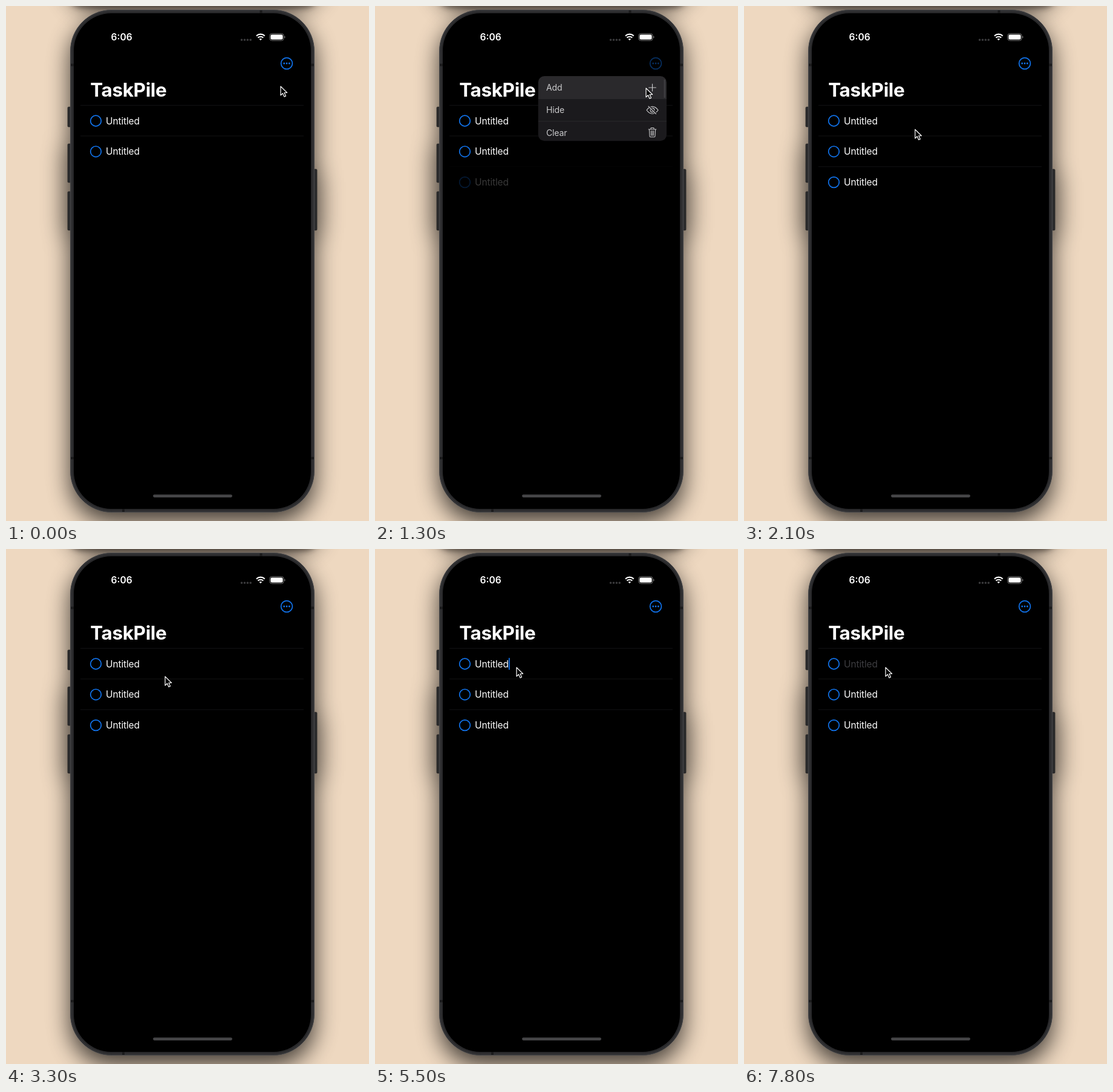
Animation, 600 px wide and 852 px high, one loop 8000 ms. Source, as an HTML page:

```html
<!DOCTYPE html>
<html lang="en">
<head>
<meta charset="utf-8">
<title>Task list</title>
<style>
html, body { margin: 0; width: 100%; height: 100%; overflow: hidden; background: #eed8c0; }
svg { display: block; }
text { font: 15.5px Inter, "Open Sans", sans-serif; letter-spacing: -.12px; fill: #fff; white-space: pre; }
.line { fill: none; stroke: #1174ee; stroke-width: 1.7; }
.icon { fill: none; stroke: #e4e4e6; stroke-width: 1.3; stroke-linecap: round; stroke-linejoin: round; }
#menu text { fill: #e4e4e6; }
</style>
</head>
<body>
<svg width="600" height="852" viewBox="0 0 600 852">
  <defs>
    <filter id="soft" x="-30%" y="-30%" width="160%" height="160%"><feGaussianBlur stdDeviation="19"/></filter>
    <filter id="tight" x="-10%" y="-50%" width="120%" height="200%"><feGaussianBlur stdDeviation="4"/></filter>
    <clipPath id="clip"><rect id="clipBox" rx="11"/></clipPath>
    <g id="row">
      <circle class="line" cx="148.5" cy="190" r="8.8"/>
    </g>
  </defs>

  <rect width="600" height="852" fill="#eed8c0"/>
  <!-- shadow of the device above, then of this one with its side buttons -->
  <rect x="100" y="-300" width="420" height="307" rx="50" opacity=".7" filter="url(#soft)"/>
  <rect x="98" y="-60" width="424" height="63" rx="30" fill="#3a302a" opacity=".6" filter="url(#tight)"/>
  <g opacity=".72" filter="url(#soft)">
    <rect x="106" y="22" width="404" height="832" rx="68"/>
    <rect x="97" y="235" width="20" height="146"/>
    <rect x="499" y="278" width="20" height="103"/>
  </g>

  <g fill="#2b2b2c" stroke="#1b1b1c" stroke-width=".6">
    <rect x="102" y="167" width="6" height="33" rx="1.5"/>
    <rect x="102" y="228" width="6" height="64" rx="1.5"/>
    <rect x="102" y="307" width="6" height="64" rx="1.5"/>
    <rect x="508" y="270" width="6" height="101" rx="1.5"/>
  </g>
  <rect x="106.5" y="6.5" width="403" height="831" rx="68" fill="#29292b" stroke="#4c4c4e"/>
  <rect x="108.5" y="8.5" width="399" height="827" rx="66" fill="none" stroke="#3a3a3c"/>
  <path d="M107 97.5h5M504 97.5h5M107 748h5M504 748h5M421.5 7v5M194 832v5" stroke="#1b1b1c" stroke-width="4"/>
  <rect x="112" y="12" width="392" height="820" rx="62"/>

  <text x="173.5" y="57.2" style="font-size:15.6px;font-weight:600;letter-spacing:0">6:06</text>
  <g fill="#3c3c3e">
    <circle cx="389.5" cy="56" r="1.8"/><circle cx="394.4" cy="56" r="1.8"/>
    <circle cx="399.3" cy="56" r="1.8"/><circle cx="404.2" cy="56" r="1.8"/>
  </g>
  <g fill="none" stroke="#fff" stroke-width="2.1">
    <path d="M413.9 49.4a10 10 0 0 1 13.8 0M416.4 52.6a6.3 6.3 0 0 1 8.8 0"/>
    <path d="M418.5 54.6q2.3-1.9 4.6 0l-2.3 2.5z" fill="#fff" stroke="none"/>
  </g>
  <rect x="435.7" y="45.6" width="23.4" height="11.6" rx="3.8" fill="none" stroke="#777" stroke-width="1"/>
  <rect x="437.3" y="47.2" width="20.2" height="8.4" rx="2.4" fill="#fff"/>
  <path d="M460.3 49.6q1.3 .5 1.3 1.8t-1.3 1.8z" fill="#777"/>

  <g id="more">
    <circle class="line" cx="464" cy="95" r="9.4"/>
    <g fill="#1174ee"><circle cx="459.7" cy="95" r="1.4"/><circle cx="464" cy="95" r="1.4"/><circle cx="468.3" cy="95" r="1.4"/></g>
  </g>
  <text x="139.3" y="149.6" style="font-size:31.5px;font-weight:700;letter-spacing:-.4px">TaskPile</text>
  <path d="M123 164.3H492M123 215H492" stroke="#131315"/>

  <use href="#row"/>
  <text id="first" x="165" y="195.6">Untitled</text>
  <rect id="caret" y="180" width="1.8" height="20" rx=".9" fill="#1174ee"/>
  <use href="#row" y="50.8"/>
  <text x="165" y="246.4">Untitled</text>
  <g id="added">
    <path d="M123 265.8H492" stroke="#131315"/>
    <use href="#row" y="101.6"/>
    <text x="165" y="297.2">Untitled</text>
  </g>
  <rect x="243" y="808.3" width="131" height="4.6" rx="2.3" fill="#454547"/>

  <g id="menu" clip-path="url(#clip)">
    <rect id="panel" x="240" y="116" width="250" height="125" fill="#1c1b1e"/>
    <g id="content">
      <rect id="press" width="235" height="41.5" fill="#fff"/>
      <path d="M0 41.4H235M0 82.8H235" stroke="#303034"/>
      <text x="14.6" y="26.3">Add</text>
      <text x="14.6" y="67.7">Hide</text>
      <text x="14.6" y="109.1">Clear</text>
      <g class="icon">
        <path d="M202.5 21H215.5M209 14.5V27.5"/>
        <path d="M198.5 62.3q4.5-6.6 10.5-6.6t10.5 6.6q-4.5 6.6-10.5 6.6t-10.5-6.6z"/>
        <circle cx="209" cy="62.3" r="3.7"/>
        <path d="M202.3 55.2L216 69" stroke="#1c1b1e" stroke-width="3.4"/>
        <path d="M201.8 55.4L215.6 69.2"/>
        <path d="M202 97.4H216M206.2 97.2V95.6q0-1 1-1H210.8q1 0 1 1V97.2M203.3 97.6L204 110q.1 1.6 1.6 1.6H212.4q1.5 0 1.6-1.6L214.7 97.6M206.6 100.2L206.9 108.8M209 100.2V108.8M211.4 100.2L211.1 108.8" stroke-width="1.2"/>
      </g>
      <rect id="bar" x="230" y="6" width="2.6" height="34" rx="1.3" fill="#77777b"/>
    </g>
  </g>

  <path id="pointer" d="M0 0V14.7L3.4 11.5 5.9 17.1 8.5 16 6 10.5H10.6Z" stroke="#fff" stroke-width="1.2" stroke-linejoin="round"/>
</svg>
<script>
const $ = id => document.getElementById(id);
const set = (id, attrs) => { for (const k in attrs) $(id).setAttribute(k, attrs[k]); };
const ramp = (t, a, b) => Math.min(1, Math.max(0, (t - a) / (b - a)));
const ease = u => u * u * (3 - 2 * u);

// pointer stops: time, x, y
const stops = [
  [0, 454, 133], [350, 464, 108], [850, 464, 108], [1200, 448, 136], [1700, 448, 136],
  [2200, 264, 212], [3200, 264, 212], [3300, 263, 211], [3700, 252, 203], [3900, 252, 203],
  [4100, 247, 200], [4400, 246, 199], [4900, 238, 197], [5200, 234, 196], [8000, 234, 196]
];

function pointerAt(t) {
  const i = Math.max(1, stops.findIndex(s => s[0] > t));
  const [a, b] = [stops[i - 1], stops[i]];
  const u = ease(ramp(t, a[0], b[0]));
  return [a[1] + (b[1] - a[1]) * u, a[2] + (b[2] - a[2]) * u];
}

function drawMenu(t) {
  const closing = t >= 1250;
  const u = closing ? ramp(t, 1250, 1650) : (1 - ramp(t, 400, 720)) ** 2;
  const scale = 1 - .76 * u, left = 463 - 214 * scale;
  set("clipBox", { x: left, y: 116, width: 235 * scale, height: Math.max(0, 124.3 * (1 - 1.072 * u)), rx: 11 - 6 * u });
  set("panel", { opacity: 1 - u ** 2.5 });
  set("content", { transform: `translate(${left} 116) scale(${scale})`, opacity: 1 - u });
  set("press", { opacity: t > 1200 ? .08 : 0 });
  set("bar", { opacity: closing ? ramp(u, 0, .4) : 0 });
  set("menu", { visibility: u < 1 ? "visible" : "hidden" });
  set("more", { opacity: .4 + .6 * u * u });
}

function drawFirstRow(t) {
  const word = "Untitled";
  const gone = t < 5600 ? 0 : Math.min(8, Math.floor((t - 5600) / 200) + 1);
  const left = word.slice(0, 8 - gone);
  const label = $("first");
  label.textContent = left || word;
  label.style.fill = left ? "#fff" : "#3d3d40";
  set("caret", {
    x: 165 + (left ? label.getComputedTextLength() : .6),
    opacity: t < 5200 ? 0 : 1 - ramp(t, 7500, 7780)
  });
}

function draw(now) {
  const t = now % 8000;
  drawMenu(t);
  drawFirstRow(t);
  set("added", { opacity: ramp(t, 1250, 1480) });
  set("pointer", { transform: `translate(${pointerAt(t)})` });
  requestAnimationFrame(draw);
}
draw(0);
</script>
</body>
</html>
```
